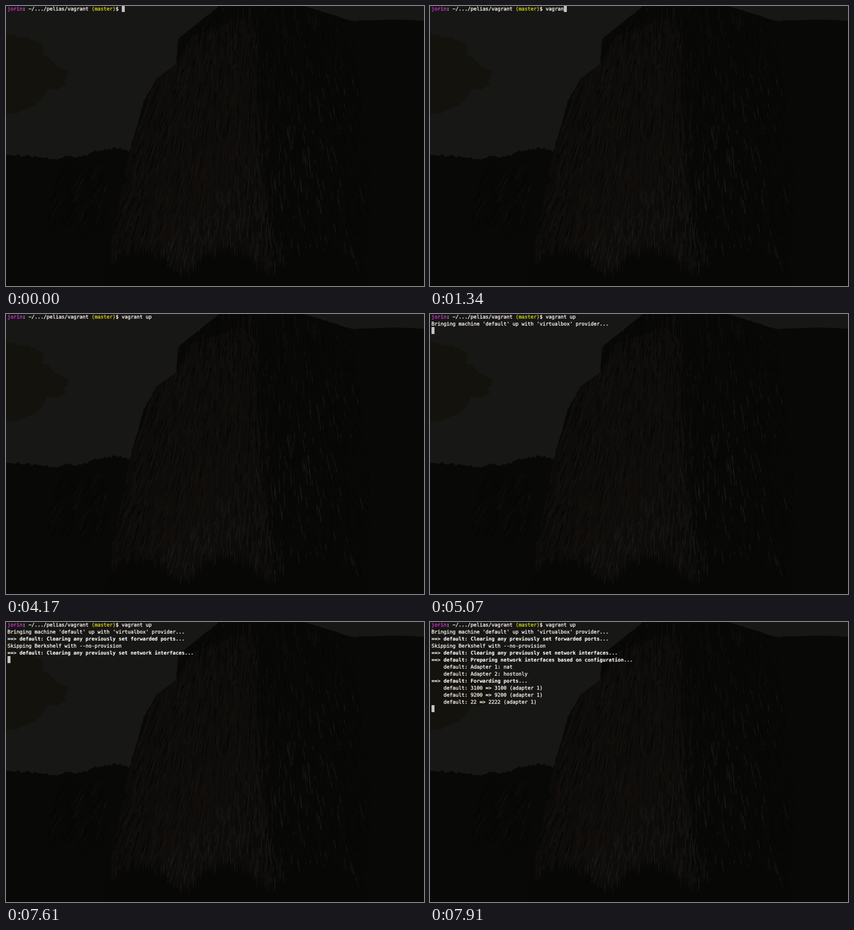
Animation, 834 px wide and 559 px high, one loop 8000 ms. Source, as an HTML page:

```html
<!DOCTYPE html>
<html lang="en">
<head>
<meta charset="utf-8">
<title>Terminal</title>
<style>
  html, body { margin: 0; width: 100%; height: 100%; overflow: hidden; background: #171715; }
  svg { display: block; width: 834px; height: 559px; }
  text {
    font: 9.966px "DejaVu Sans Mono", monospace;
    color: #fff5f0;
    fill: currentColor;
    stroke: currentColor;
    stroke-width: 0.35px;
    white-space: pre;
    text-rendering: geometricPrecision;
  }
  .bold { font-weight: bold; color: #fff; stroke-width: 0.1px; }
  .user { color: #da35d8; }
  .branch { color: #d2cf18; }
</style>
</head>
<body>
<svg viewBox="0 0 834 559">
  <clipPath id="face"><path d="M425 0L343 66L340 116L300 145L275 190L247 289L210 475V559H700L740 400L690 30L590 0Z"/></clipPath>
  <g id="scene"></g>
  <g id="screen"></g>
  <rect id="cursor" width="6" fill="#c6c1be"/>
</svg>
<script>
const LOOP = 8000, CELL = 6, LINE = 14, LEFT = 3;
const PROMPT_COLS = 38, COMMAND = 'vagrant up';
const TYPE_START = 750, TYPE_TICK = 145, KEYS_PER_TICK = 1.3, ENTER = 2070;

const OUTPUT = [
  { at: 5070, text: "Bringing machine 'default' up with 'virtualbox' provider..." },
  { at: 5970, text: '==> default: Clearing any previously set forwarded ports...' },
  { at: 6110, text: 'Skipping Berkshelf with --no-provision' },
  { at: 7610, text: '==> default: Clearing any previously set network interfaces...' },
  { at: 7760, text: '==> default: Preparing network interfaces based on configuration...' },
  { at: 7760, text: '    default: Adapter 1: nat' },
  { at: 7760, text: '    default: Adapter 2: hostonly' },
  { at: 7910, text: '==> default: Forwarding ports...' },
  { at: 7910, text: '    default: 3100 => 3100 (adapter 1)' },
  { at: 7910, text: '    default: 9200 => 9200 (adapter 1)' },
  { at: 7910, text: '    default: 22 => 2222 (adapter 1)' }
];

const $ = id => document.getElementById(id);

function add(parent, tag, attrs, content = '') {
  const el = document.createElementNS('http://www.w3.org/2000/svg', tag);
  for (const key in attrs) el.setAttribute(key, attrs[key]);
  el.textContent = content;
  return parent.appendChild(el);
}

let seed = 11;
const rand = (a, b) => {
  seed = (seed * 16807) % 2147483647;
  return a + (b - a) * seed / 2147483647;
};

// Closed shape through key points, its edges broken up by random offsets.
function rough(points, step, jitterX, jitterY, fill) {
  const path = [];
  points.forEach(([x, y], i) => {
    const [nx, ny] = points[(i + 1) % points.length];
    const n = Math.ceil(Math.hypot(nx - x, ny - y) / step);
    for (let k = 0; k < n; k++) {
      const px = x + (nx - x) * k / n + rand(-jitterX, jitterX);
      const py = y + (ny - y) * k / n + rand(-jitterY, jitterY);
      path.push(px.toFixed(1) + ' ' + py.toFixed(1));
    }
  });
  add($('scene'), 'path', { d: `M${path.join('L')}Z`, fill });
}

// Rock grain: strokes that fan out with x, lit around the middle of the face.
function grain(count, x, y, w, h, clip) {
  const strokes = { '#14100d': '', '#161614': '', '#060605': '' };
  for (let i = 0; i < count; i++) {
    const sx = rand(x, x + w), sy = rand(y, y + h), len = rand(6, 34);
    const lit = rand(0, 1) < Math.exp(-(((sx - 400) / 150) ** 2)) * (0.35 + sy / 700) + 0.1;
    const color = !lit ? '#060605' : sx + sy > 790 ? '#161614' : '#14100d';
    const lean = 0.42 - (sx - 210) / 700;
    strokes[color] += `M${sx.toFixed(1)} ${sy.toFixed(1)}l${(-len * lean + rand(-2, 2)).toFixed(1)} ${len.toFixed(1)}`;
  }
  for (const stroke in strokes) {
    add($('scene'), 'path', { d: strokes[stroke], stroke, 'stroke-width': 1.5, 'clip-path': clip });
  }
}

function drawScene() {
  add($('scene'), 'rect', { width: 834, height: 559, fill: '#171715' });
  rough([[-9, 55], [50, 65], [75, 78], [72, 98], [122, 132], [116, 160], [82, 168], [70, 190], [18, 216], [-9, 212]],
    7, 3, 3, '#14120c');
  rough([[425, 0], [343, 66], [340, 116], [300, 145], [275, 190], [247, 289], [210, 475], [260, 570],
    [844, 570], [844, 29], [765, 27], [690, 30], [590, -2]], 8, 0.8, 0.8, '#080807');
  rough([[-5, 297], [60, 301], [100, 307], [115, 300], [155, 300], [180, 288], [220, 283], [250, 289],
    [210, 475], [260, 570], [-5, 570]], 4, 1, 3, '#080807');
  add($('scene'), 'path', {
    d: 'M340 116L300 145L247 289L210 475V559H540L500 180L505 60L470 25L370 60Z',
    fill: '#0e0c0a', 'clip-path': 'url(#face)'
  });
  grain(2800, 210, -10, 510, 540, 'url(#face)');
  grain(160, 95, 310, 110, 130, 'none');

  // Treetops, with two gaps where the rock reaches further down.
  let trees = 'M195 559';
  for (let x = 200; x < 720; x += rand(3, 6)) {
    const base = 492 + 46 * Math.cos(Math.PI * (x - 356) / 172) ** 4;
    trees += `L${x.toFixed(1)} ${(base + rand(0, 14)).toFixed(1)}l2 ${(-rand(8, 38)).toFixed(1)}`;
  }
  add($('scene'), 'path', { d: trees + 'V559Z', fill: '#070706' });
}

function row(index, text, cls = '') {
  return add($('screen'), 'text', { x: LEFT, y: 9 + index * LINE, class: cls }, text);
}

drawScene();
const prompt = row(0, '');
add(prompt, 'tspan', { class: 'user' }, 'jorin');
add(prompt, 'tspan', {}, ': ~/.../pelias/vagrant ');
add(prompt, 'tspan', { class: 'branch' }, '(master)');
add(prompt, 'tspan', {}, '$ ');
const typedText = add(prompt, 'tspan', {});
const lines = OUTPUT.map(({ text }, i) => row(i + 1, text, text.startsWith('==>') ? 'bold' : ''));
const cursor = $('cursor');

function typedCount(time) {
  if (time < TYPE_START) return 0;
  const tick = Math.floor((time - TYPE_START) / TYPE_TICK);
  return Math.min(COMMAND.length, Math.floor(1 + tick * KEYS_PER_TICK));
}

const isVisible = on => on ? 'visible' : 'hidden';
const between = (time, from, to) => time >= from && time < to;

function render() {
  const time = performance.now() % LOOP;
  const typed = typedCount(time);
  typedText.textContent = COMMAND.slice(0, typed);
  lines.forEach((el, i) => el.setAttribute('visibility', isVisible(time >= OUTPUT[i].at)));

  const line = time < ENTER ? 0 : 1 + OUTPUT.filter(({ at }) => time >= at).length;
  const top = Math.max(0, line * LINE - 2);
  const blinkOff = between(time, 450, TYPE_START) || between(time, 4170, OUTPUT[0].at);
  cursor.setAttribute('x', LEFT + (line ? 0 : (PROMPT_COLS + typed) * CELL));
  cursor.setAttribute('y', top);
  cursor.setAttribute('height', line * LINE + 12 - top);
  cursor.setAttribute('visibility', isVisible(!blinkOff));
  requestAnimationFrame(render);
}
render();
</script>
</body>
</html>
```
